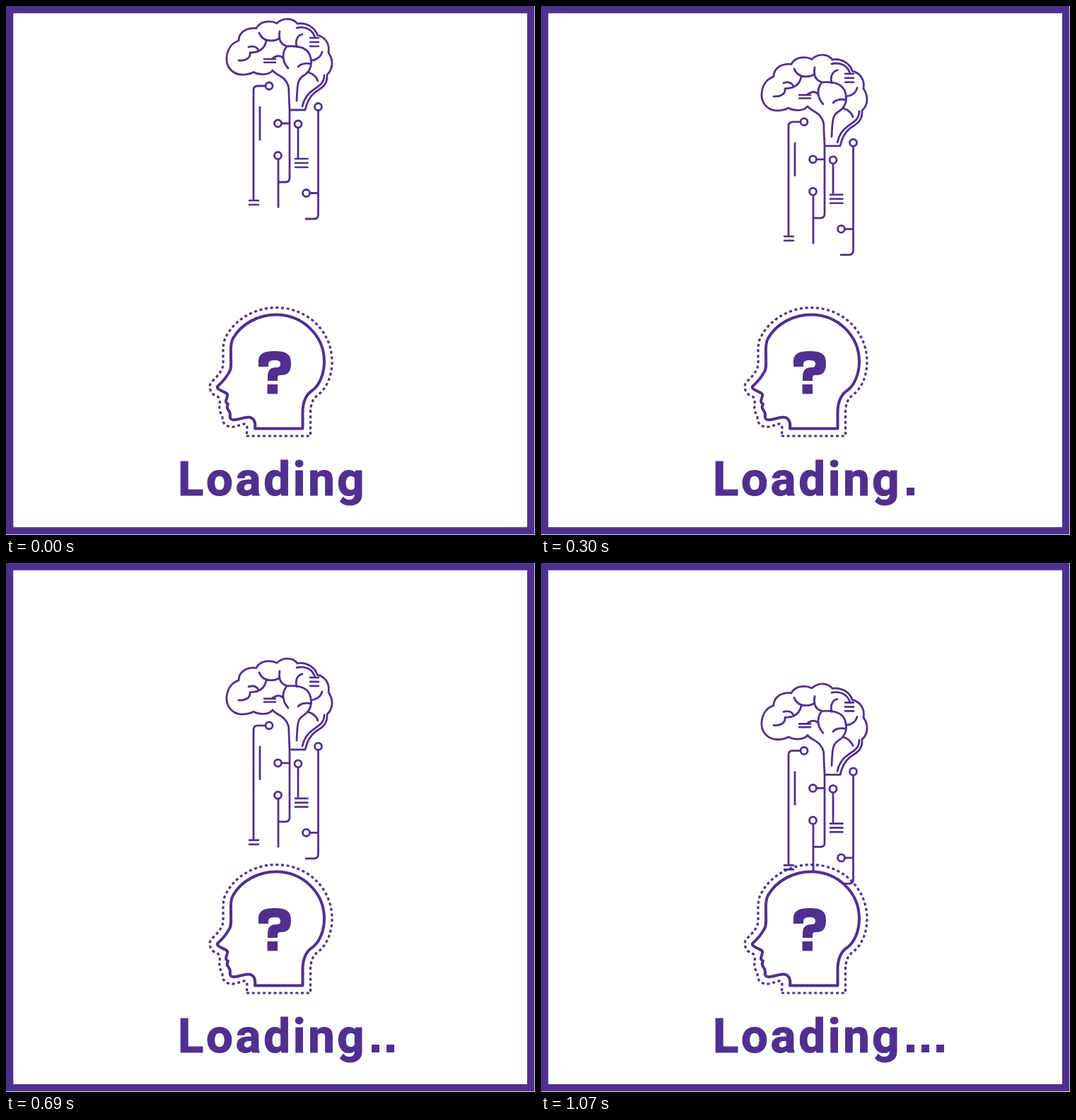
Recreate the animation shown at these times as an HTML page with a canvas. Size 748 px wide and 748 px high, loop 1400 ms.

```html
<!DOCTYPE html>
<html lang="en">
<head>
<meta charset="utf-8">
<title>Loading</title>
<style>
  html, body { margin: 0; width: 100%; height: 100%; overflow: hidden; background: #fff; }
  canvas { display: block; }
</style>
</head>
<body>
<canvas id="stage" width="748" height="748">Loading...</canvas>
<script>
const ctx = document.getElementById('stage').getContext('2d');
const PURPLE = '#50308f';
const LOOP = 1400, STEP = 30, TRAVEL_STEPS = 30, TRAVEL = 152.4;
const DOT_TIMES = [240, 660, 1070];

const brain = new Path2D(`
  M350 93.5 C345 96 338 97.5 332 97 C320 96 311 86 312 73 C313 60 320 52 329 49
  C329 38 339 30 354 31.5 C359 21 374 20 383 24.5 C391 16.5 405 16 412 25
  C424 23 437 30 440 41 C452 44 458 54 456 66 C463 76 463 89 454 97
  C455 112 446 116 437 122 C428 129 425 138 423 147 L401 147
  L400 125 C400 115 400 111 394 104 C389 98 381 97 377 91 C372 98 358 98 350 93.5
  M450 98 C450 110 442 113 434 119 C425 125 421 133 419 142
  M411 31 C424 28 434 34 437 45
  M358 38 C361 46 368 49 375 49 C381 49 385 47 387 45
  M387 36 C385 48 389 55 398 57
  M368 49 C366 60 358 66 345 66 C346 74 338 78 329 77
  M343 58 C350 56 355 58 357 63
  M399 88 C390 78 390 66 397 57 C410 56 424 58 429 68
  C434 80 432 92 420 99 C412 104 412 112 411 134
  M431 82 C424 80 416 82 413 86
  M376 75 C381 70 388 69 392 74
  M419 40 C411 42 409 50 411 58
  M447 65 C445 73 437 77 431 77
  M428 94 C435 96 440 102 441 106`);

const circuit = new Path2D(`
  M367 113 H356 Q350 113 350 119 V274 M359 142 V190
  M389 166 H401 M401 147 V243 Q401 249 395 249 H385
  M385 217 V285.5 M413 172 V215
  M441.5 147 V295 Q441.5 301 435.5 301 H423 M430 264.5 H441`);

for (const [x, y] of [[372, 113], [384.5, 166], [384.5, 211.5], [413, 167], [441.5, 142.5], [424.5, 264.5]]) {
  circuit.moveTo(x + 5, y);
  circuit.arc(x, y, 5, 0, Math.PI * 2);
}

const bars = new Path2D();
function addBars(left, right, top, gap, count) {
  for (let i = 0; i < count; i++) {
    bars.moveTo(left, top + i * gap);
    bars.lineTo(right, top + i * gap);
  }
}
addBars(430, 442, 45, 6, 3);
addBars(365, 381, 75, 4.7, 2);
addBars(344, 357, 275, 6, 2);
addBars(409, 426.5, 216, 6, 3);

const head = new Path2D(`
  M352 597.5 H419.5 V575 C419.5 560 424 549 434 543 C444 535 450 519 450 503
  C450 466 419.5 436.5 382 436.5 C357 436.5 333 449 321 470 C317 477 318 485 318 492
  C318 506 319 512 316 517 C312 524 307 531 300 537 Q297 539 301 542
  C305 545 311 546 313 549 C314 551 311 556 311 559 Q311 561 314 563
  Q312 566 313 569 C315 572 317 574 317 578 C316 583 318 586 324 585
  C332 584 340 580 346 582 C351 584 353 590 352 597.5 Z`);

const halo = new Path2D(`
  M340 608 H430.5 V577 C430.5 562 434 555 441 550 C454 540 461 522 461 503
  C461 460 426 426.5 382 426.5 C353 426.5 325 442 312 466 C307 474 307 482 307 492
  C307 503 308 510 304 516 C301 521 297 526 291 531 C286 537 288 544 293 549
  C297 551 301 552 302 556 C303 562 301 567 302 573 C304 576 306 579 306 582
  C306 591 312 596 322 595 C329 594 335 590 339 591 C342 594 341 600 340 608`);

const question = new Path2D(`
  M357 510 V503 C357 492 364 488 380 488 C396 488 403 492 403 505
  C403 517 399 522 389 522 C385 522 384 523 384 526 V530 H370 V525
  C370 516 373 511 382 511 C387 511 388 509 388 506 C388 502 385 501 380 501
  C374 501 371 502 371 507 V510 Z M369.5 535 H384 V548.5 H369.5 Z`);

function stroke(path, width, cap = 'butt', dash = []) {
  ctx.lineWidth = width;
  ctx.lineCap = cap;
  ctx.setLineDash(dash);
  ctx.stroke(path);
}

function drawFrame() {
  ctx.setLineDash([]);
  ctx.lineJoin = 'miter';
  ctx.lineWidth = 10.3;
  ctx.strokeRect(5.15, 5.15, 736.9, 736.9);
  ctx.lineJoin = 'round';
}

function drawBrain(offset) {
  ctx.save();
  ctx.translate(0, offset);
  stroke(brain, 2.8, 'round');
  stroke(circuit, 2.8);
  stroke(bars, 2.6, 'round');
  ctx.restore();
}

function drawHead() {
  ctx.fillStyle = '#fff';
  ctx.fill(head);
  stroke(head, 4);
  stroke(halo, 3.2, 'butt', [4, 3.7]);
  ctx.fillStyle = PURPLE;
  ctx.fill(question);
}

function drawLabel(time) {
  ctx.font = '700 67px Roboto, sans-serif';
  ctx.letterSpacing = '3.7px';
  ctx.setLineDash([]);
  ctx.lineJoin = 'miter';
  ctx.lineWidth = 1.2;
  ctx.fillText('Loading', 243, 692);
  ctx.strokeText('Loading', 243, 692);
  DOT_TIMES.forEach((start, i) => {
    if (time >= start) ctx.fillRect(517 + i * 21, 681, 11, 11);
  });
}

function draw(time) {
  ctx.fillStyle = '#fff';
  ctx.fillRect(0, 0, 748, 748);
  ctx.strokeStyle = PURPLE;
  drawFrame();
  const step = Math.min(TRAVEL_STEPS, Math.floor(time / STEP));
  drawBrain(TRAVEL * step / TRAVEL_STEPS);
  drawHead();
  drawLabel(time);
}

function tick() {
  draw(performance.now() % LOOP);
  requestAnimationFrame(tick);
}
tick();
</script>
</body>
</html>
```
